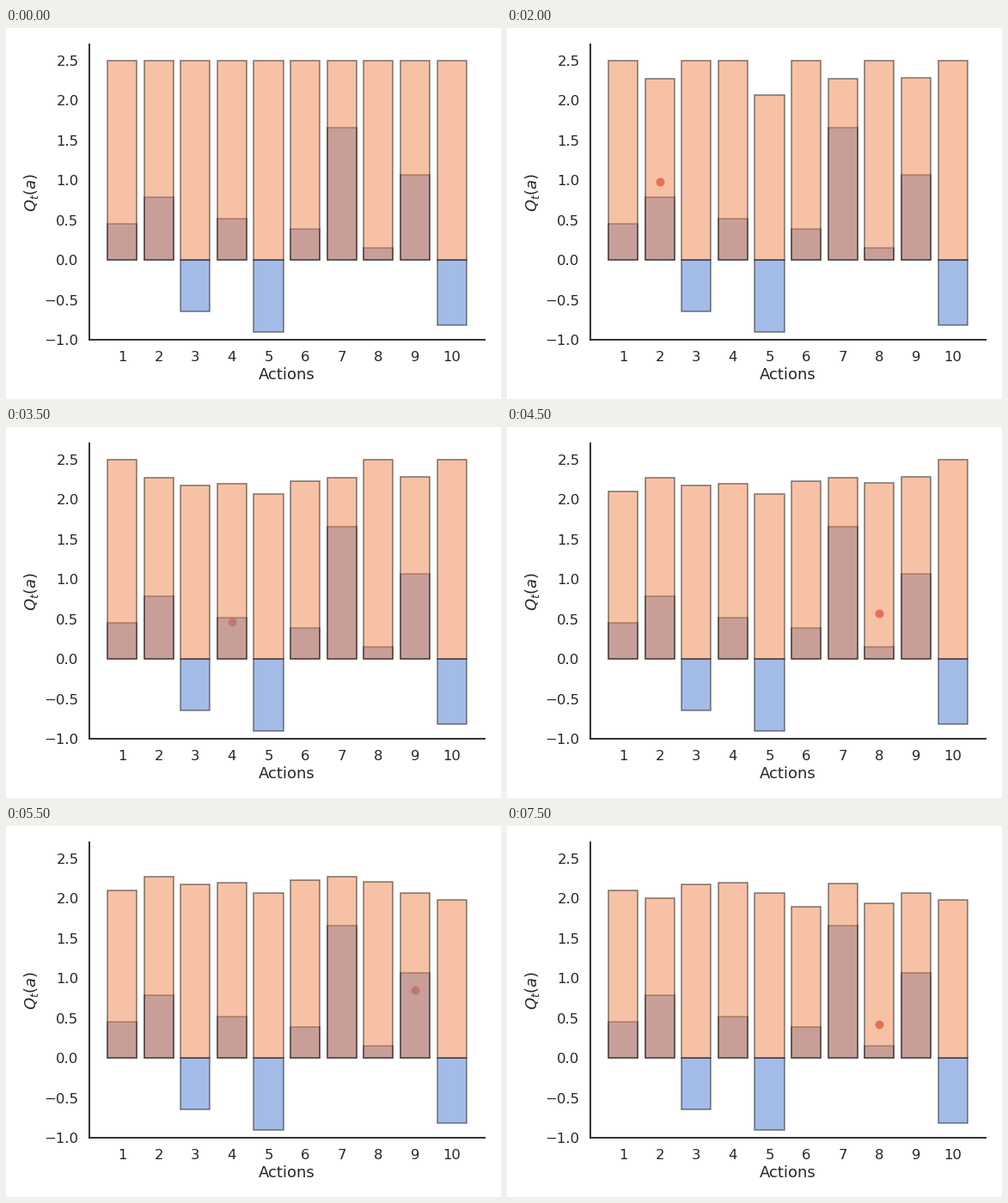
A matplotlib script that plays this animation: 576 by 432 pixels, repeating every 8000 ms.

```python
import matplotlib.pyplot as plt
from matplotlib.animation import FuncAnimation

INK = "0.15"
BLUE, ORANGE, RED = "#4878D0", "#EE854A", "#D65F5F"
RATE = 0.15   # learning rate
START = 2.5   # optimistic first estimate
STEPS = 15
TALK = 1.5    # scale of text and lines

ticks = {f"{a}tick.{key}": value for a in "xy" for key, value in {
    "labelsize": 10.99 * TALK, "major.size": 6 * TALK, "color": INK}.items()}
plt.rcParams.update(ticks)
plt.rcParams.update({
    "font.family": "DejaVu Sans",
    "font.size": 12 * TALK,
    "axes.labelsize": 12 * TALK,
    "axes.labelcolor": INK,
    "axes.edgecolor": INK,
    "axes.linewidth": 1.25 * TALK,
    "patch.linewidth": TALK,
    "lines.markersize": 6 * TALK,
    "axes.spines.top": False,
    "axes.spines.right": False,
    "xtick.bottom": False,
    "ytick.left": False,
})

# action: (true value, reward of each pull); ties go to the first listed
arms = {
    9: (1.07, 1.10, 0.85),
    5: (-0.90, -0.40),
    7: (1.66, 0.97, 1.75),
    2: (0.79, 0.98, 0.47),
    6: (0.39, 0.68, 0.0),
    3: (-0.645, 0.34),
    4: (0.52, 0.46),
    1: (0.45, -0.12),
    8: (0.15, 0.57, 0.42),
    10: (-0.82, -0.94),
}


def greedy(steps):
    """Estimates, last action and last reward after always pulling the best arm."""
    q = dict.fromkeys(arms, START)
    pulls = dict.fromkeys(arms, 0)
    action = reward = None
    for _ in range(steps):
        action = max(q, key=q.get)
        pulls[action] += 1
        reward = arms[action][pulls[action]]
        q[action] += RATE * (reward - q[action])
    return q, action, reward


fig, ax = plt.subplots(figsize=(8, 6), dpi=72)
actions = sorted(arms)
style = dict(width=0.8, alpha=0.5, edgecolor="black")
ax.bar(actions, [arms[a][0] for a in actions], color=BLUE, **style)
bars = ax.bar(actions, START, color=ORANGE, **style)
dot, = ax.plot([], [], "o", color=RED, zorder=0.5)  # below the bars

ax.set_xlim(0.11, 10.89)
ax.set_ylim(-1, 2.7)
ax.set_xticks(actions)
ax.set_xlabel("Actions")
ax.set_ylabel("$Q_t(a)$")
fig.tight_layout()


def update(step):
    q, action, reward = greedy(step)
    for a, bar in zip(actions, bars):
        bar.set_height(q[a])
    dot.set_data(([action], [reward]) if step else ([], []))
    return [*bars, dot]


anim = FuncAnimation(fig, update, frames=STEPS + 1, interval=500,
                     repeat=True, repeat_delay=0)
plt.show()
```
